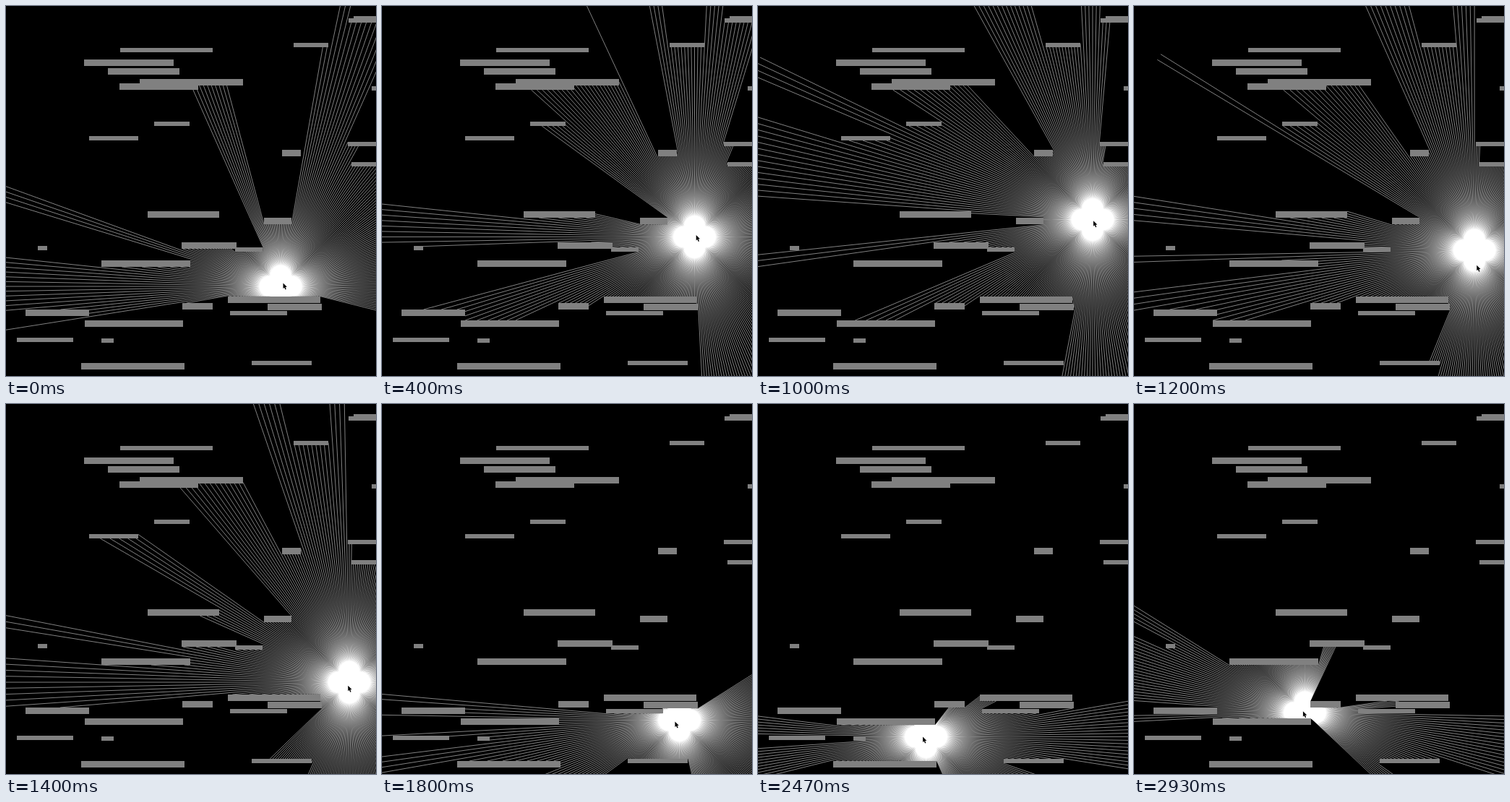
An HTML page with a canvas for the animation above (2990 ms loop, 512 by 512 pixels).

```html
<!DOCTYPE html>
<html>
<head>
<meta charset="utf-8">
<style>
html, body { margin: 0; height: 100%; overflow: hidden; background: #000; }
canvas { display: block; }
</style>
</head>
<body>
<canvas id="stage" width="512" height="512"></canvas>
<script>
const ctx = document.getElementById('stage').getContext('2d');
const SIZE = 512, LOOP = 2990, STEP = 66.6, LAST = 44;
const GRAY = 'rgb(128,128,128)';

// Walls come in two thicknesses; each is given by left, top and width
const wall = height => ([x, y, width]) => [x, y, width, height];
const walls = [
  ...[[158, 58, 128], [205, 160, 49], [115, 180, 68], [398, 51, 48], [474, 17, 20],
    [506, 111, 6], [473, 188, 39], [478, 216, 34], [317, 334, 38], [44, 332, 13],
    [310, 422, 79], [15, 459, 78], [132, 460, 17], [340, 491, 83]].map(wall(6)),
  ...[[108, 74, 124], [141, 86, 99], [185, 101, 143], [157, 107, 109], [481, 14, 31],
    [382, 199, 26], [357, 293, 38], [196, 284, 99], [243, 327, 76], [132, 352, 123],
    [27, 420, 88], [109, 435, 136], [244, 411, 42], [307, 402, 128], [362, 412, 75],
    [104, 494, 143]].map(wall(9))
];

// Key points of the light: step, x, y
const keys = [
  [0, 380, 388], [6, 432.5, 319.5], [15, 463, 295.5], [21, 475, 385],
  [27, 411.5, 437.5], [37, 232.5, 460.5], [41, 256, 441], [LAST, 236.5, 427]
];

// Spline slope at a key, slackened so that the light lingers there
function slope(i, axis) {
  const a = keys[Math.max(i - 1, 0)], b = keys[Math.min(i + 1, keys.length - 1)];
  return 0.4 * (b[axis] - a[axis]) / (b[0] - a[0]);
}

// Position and speed per step along one axis
function follow(step, axis) {
  const i = Math.max(1, keys.findIndex(k => k[0] >= step)) - 1;
  const a = keys[i], b = keys[i + 1], span = b[0] - a[0], u = (step - a[0]) / span;
  const move = b[axis] - a[axis];
  const v = slope(i, axis) * span, w = slope(i + 1, axis) * span;
  const c2 = 3 * move - 2 * v - w, c3 = v + w - 2 * move;
  return [a[axis] + u * (v + u * (c2 + u * c3)), (v + u * (2 * c2 + 3 * u * c3)) / span];
}

// Distance along a ray to the nearest wall
function cast(x, y, dx, dy) {
  let best = SIZE;
  for (const [left, top, w, h] of walls) {
    const x1 = (left - x) / dx, x2 = (left + w - x) / dx;
    const y1 = (top - y) / dy, y2 = (top + h - y) / dy;
    const near = Math.max(Math.min(x1, x2), Math.min(y1, y2));
    const far = Math.min(Math.max(x1, x2), Math.max(y1, y2));
    if (far < 0 || near > far) continue;
    best = Math.min(best, near > 0 ? near : far);
  }
  return best;
}

// One ray per degree; overlapping rays add up to white
function drawRays(x, y) {
  ctx.globalCompositeOperation = 'lighter';
  ctx.strokeStyle = GRAY;
  for (let deg = 0; deg < 360; deg++) {
    const a = deg * Math.PI / 180, dx = Math.cos(a), dy = Math.sin(a);
    const r = cast(x, y, dx, dy);
    ctx.beginPath();
    ctx.moveTo(x, y);
    ctx.lineTo(x + dx * r, y + dy * r);
    ctx.stroke();
  }
  ctx.globalCompositeOperation = 'source-over';
}

const arrow = new Path2D('M0 0V7.5L1.7 6 3 9 4.3 8.4 3.1 5.5 5.3 5.3Z');

function drawCursor(x, y) {
  ctx.save();
  ctx.translate(x, y);
  ctx.strokeStyle = 'rgba(255,255,255,.6)';
  ctx.stroke(arrow);
  ctx.fillStyle = '#000';
  ctx.fill(arrow);
  ctx.restore();
}

function draw(time) {
  const step = Math.min(LAST, Math.floor((time % LOOP + 5) / STEP));
  const [x, vx] = follow(step, 1), [y, vy] = follow(step, 2);
  ctx.fillStyle = '#000';
  ctx.fillRect(0, 0, SIZE, SIZE);
  drawRays(x, y);
  ctx.fillStyle = GRAY;
  for (const w of walls) ctx.fillRect(...w);
  // The pointer runs one step ahead of the light
  drawCursor(x + vx, y + vy);
}

const start = performance.now();
function tick() {
  draw(performance.now() - start);
  requestAnimationFrame(tick);
}
tick();
</script>
</body>
</html>
```
